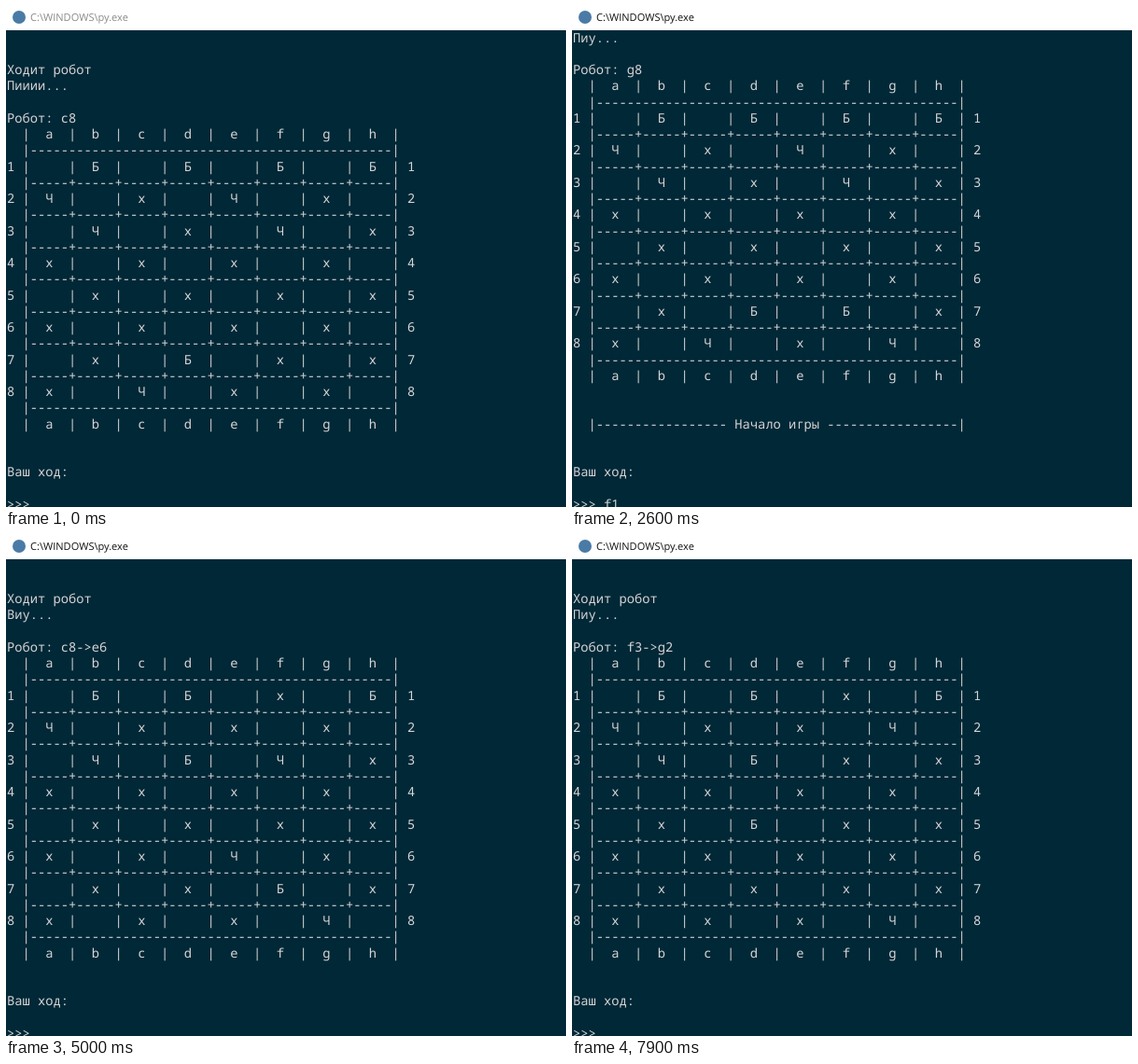
An HTML page that plays this animation: 600x537 px, repeating every 8 s.

```html
<!DOCTYPE html>
<html lang="ru">
<head>
<meta charset="utf-8">
<style>
  html, body { margin: 0; width: 600px; height: 537px; overflow: hidden; background: #012837; }
  body { position: relative; }
  header {
    position: absolute; z-index: 1; width: 100%; height: 26px; background: #fff;
    font: 11.05px/25px "Open Sans", sans-serif; text-rendering: geometricPrecision;
  }
  #title { position: absolute; left: 26px; }
  #icon { position: absolute; left: 7px; top: 5px; width: 14px; height: 14px; border-radius: 50%; background: #4a7ba6; }
  #screen {
    position: absolute; left: .9px; top: 25.7px; margin: 0; color: #d6d6d6;
    font: 13.75px/17.25px "Noto Sans Mono", monospace;
    text-rendering: geometricPrecision; font-variant-ligatures: none;
  }
</style>
</head>
<body>
<header><span id="icon"></span><span id="title">C:\WINDOWS\py.exe</span></header>
<pre id="screen"></pre>
<script>
const LOOP = 8000, ROWS = 30, ACTIVATE = 300;
const FILES = [...'abcdefgh'];
const title = document.getElementById('title');
const screen = document.getElementById('screen');

const pieces = { b1: 'Б', d1: 'Б', f1: 'Б', h1: 'Б', a2: 'Ч', e2: 'Ч', b3: 'Ч', f3: 'Ч', d7: 'Б', c8: 'Ч' };
const events = [];
const print = (time, text) => events.push([time, text]);

function board() {
  const row = cells => '|' + cells.map(c => `  ${c}  |`).join('');
  const names = '  ' + row(FILES);
  const border = `  |${'-'.repeat(47)}|`;
  const divider = `\n  |${Array(8).fill('-----').join('+')}|\n`;
  const ranks = [1, 2, 3, 4, 5, 6, 7, 8].map(n => {
    // Empty playable squares show an x.
    const cells = FILES.map((f, i) => pieces[f + n] || ((i + n) % 2 ? ' ' : 'x'));
    return `${n} ${row(cells)} ${n}`;
  });
  return [names, border, ranks.join(divider), border, names].join('\n');
}

// "f7" places a piece, "f1->d3" moves one and captures what it jumps over.
function move(text, piece) {
  const [from, to] = text.split('->');
  if (!to) { pieces[from] = piece; return; }
  const mid = i => (from.charCodeAt(i) + to.charCodeAt(i)) / 2;
  delete pieces[from];
  if (Number.isInteger(mid(0))) delete pieces[String.fromCharCode(mid(0), mid(1))];
  pieces[to] = piece;
}

const PROMPT = '\n\n\nВаш ход:\n\n>>> ';

function player(text, keyTimes, enter) {
  keyTimes.forEach((time, i) => print(time, text[i]));
  move(text, 'Б');
  print(enter, `\n${board()}\n\n\nХодит робот\n`);
}

function robot(text, sound, soundTime, time, banner = '') {
  print(soundTime, `${sound}...\n\n`);
  move(text, 'Ч');
  print(time, `Робот: ${text}\n${board()}${banner}${PROMPT}`);
}

const dashes = '-'.repeat(17);

print(0, '\n\nХодит робот\n');
robot('c8', 'Пииии', 0, 0);
player('f7', [400, 600], 800);
robot('g8', 'Пиу', 1100, 1500, `\n\n\n  |${dashes} Начало игры ${dashes}|`);
player('f1->d3', [2400, 2500, 2800, 2900, 3000, 3100], 3200);
robot('c8->e6', 'Виу', 3500, 3800);
player('f7->d5', [5800, 6100, 6200, 6300, 6400, 6600], 6800);
robot('f3->g2', 'Пиу', 7100, 7400);

let shown = '';
function draw(now) {
  const t = now % LOOP;
  const log = events.filter(([time]) => time <= t).map(e => e[1]).join('');
  if (log !== shown) {
    shown = log;
    screen.textContent = log.split('\n').slice(-ROWS).join('\n');
  }
  title.style.color = t < ACTIVATE ? '#8a8a8a' : '#111';
  requestAnimationFrame(draw);
}
draw(performance.now());
</script>
</body>
</html>
```
